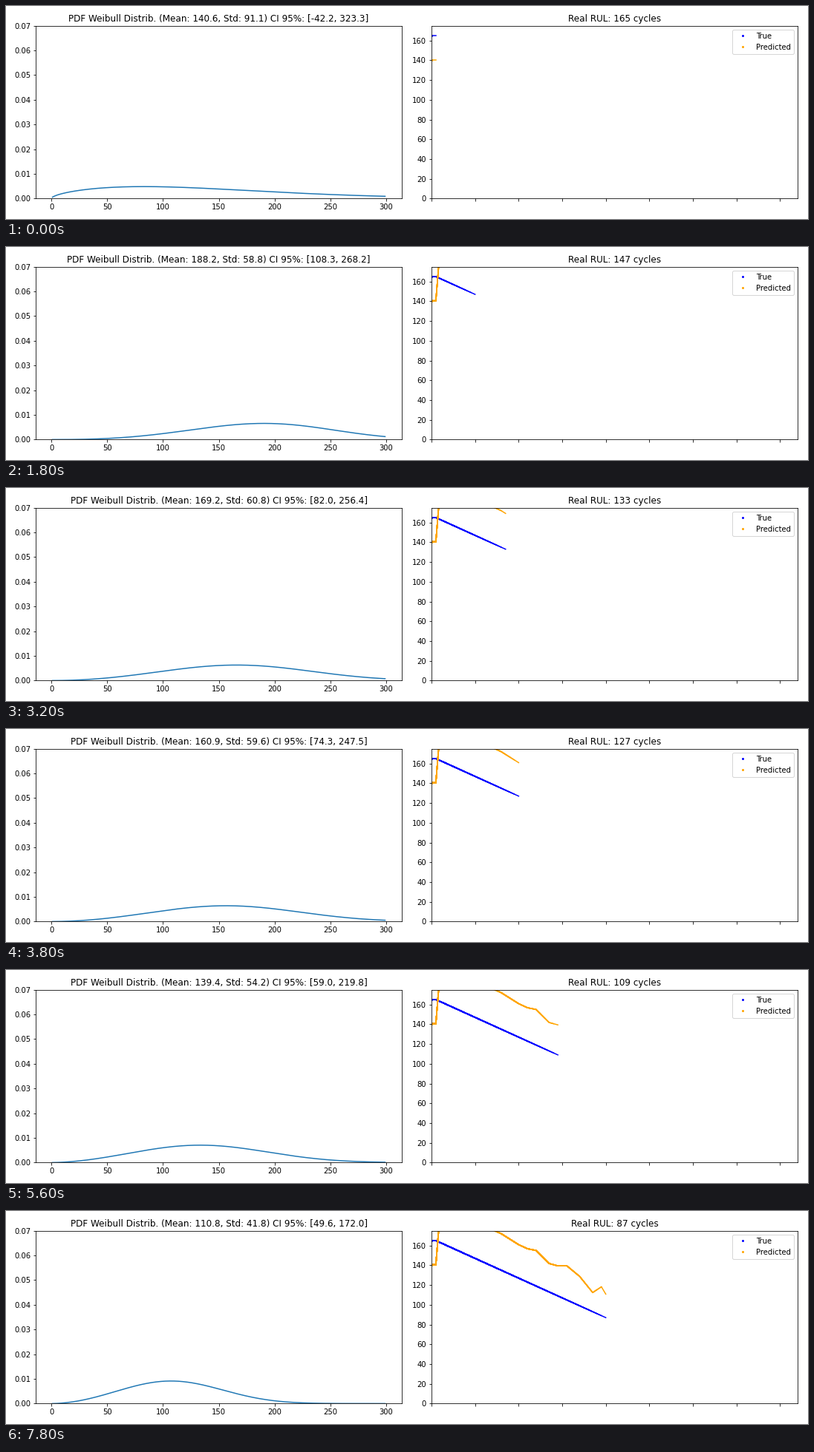
Write a matplotlib script that moves like this. It is 1080 px wide and 288 px high and loops after 8000 ms.

```python
import math

import numpy as np
import matplotlib.pyplot as plt
from matplotlib.animation import FuncAnimation

W, H, DPI = 1080, 288, 72
FRAMES, INTERVAL = 40, 200

# step, predicted mean, standard deviation
KEYS = np.array([
    (0, 140.56, 91.1), (1, 195, 58.5), (5, 201.64, 55.1), (12, 178.2, 61.5),
    (15, 172, 61.2), (19, 160.9, 59.6), (21, 156.8, 58.8), (23, 155, 58.6),
    (26, 141.8, 54.6), (28, 139.4, 54.2), (30, 139.7, 54.7), (33, 128.76, 51.0),
    (36, 112.4, 43.8), (38, 118.2, 45.0), (39, 110.8, 41.8)])

steps = np.arange(FRAMES)
MEAN, STD = (np.interp(steps, KEYS[:, 0], col) for col in KEYS.T[1:])
# The interval widens with the relative spread
HALF = STD * np.polyval([1.237, 0.7339, 1.011], STD / MEAN)
RUL = 165 - 2 * steps


def weibull_params(mean, std):
    """Scale and shape that give this mean and deviation."""
    target = 1 + (std / mean) ** 2
    lo, hi = 0.5, 20.0
    for _ in range(50):
        b = (lo + hi) / 2
        if math.gamma(1 + 2 / b) / math.gamma(1 + 1 / b) ** 2 > target:
            lo = b
        else:
            hi = b
    return mean / math.gamma(1 + 1 / b), b


def weibull_pdf(t, mean, std):
    a, b = weibull_params(mean, std)
    return b / a * (t / a) ** (b - 1) * np.exp(-(t / a) ** b)


def add_axes(left):
    top, bottom, width = 26.67, 260.33, 492.8
    return fig.add_axes([left / W, 1 - bottom / H, width / W, (bottom - top) / H])


plt.rcParams.update({"font.family": "DejaVu Sans", "font.size": 10})
fig = plt.figure(figsize=(W / DPI, H / DPI), dpi=DPI, facecolor="white")

ax_pdf = add_axes(40.12)
t = np.arange(1, 300)
curve, = ax_pdf.plot(t, np.zeros(len(t)), color="C0", lw=1.5)
ax_pdf.set_xlim(-13.9, 313.9)
ax_pdf.set_ylim(0, 0.07)
pdf_title = ax_pdf.set_title("", fontsize=12)

ax_rul = add_axes(573)
ax_rul.set_xlim(0, 168)
ax_rul.set_ylim(0, 175)
ax_rul.set_xticks(range(0, 161, 20), labels=[])
ax_rul.set_yticks(range(0, 161, 20))
rul_title = ax_rul.set_title("", fontsize=12)

# Each step redraws the whole path so far, so older parts look heavier
x = 2 * np.arange(FRAMES + 1)
layers = [[] for _ in steps]
for values, color, label in ((RUL, "b", "True"), (MEAN, "orange", "Predicted")):
    ax_rul.plot(0, values[0], ".", color=color, ms=4, label=label)
    y = np.r_[values[0], values]
    for k in steps:
        layers[k] += ax_rul.plot(x[:k + 2], y[:k + 2], color=color, lw=1.5)
ax_rul.legend(loc="upper right")


def update(k):
    mean, std, half = MEAN[k], STD[k], HALF[k]
    curve.set_ydata(weibull_pdf(t, mean, std))
    pdf_title.set_text(
        f"PDF Weibull Distrib. (Mean: {mean:.1f}, Std: {std:.1f}) "
        f"CI 95%: [{mean - half:.1f}, {mean + half:.1f}]")
    rul_title.set_text(f"Real RUL: {RUL[k]} cycles")
    for i, lines in enumerate(layers):
        for line in lines:
            line.set_visible(i <= k)
    return []


anim = FuncAnimation(fig, update, frames=FRAMES, interval=INTERVAL,
                     init_func=lambda: update(0), repeat=True, blit=False)
plt.show()
```
